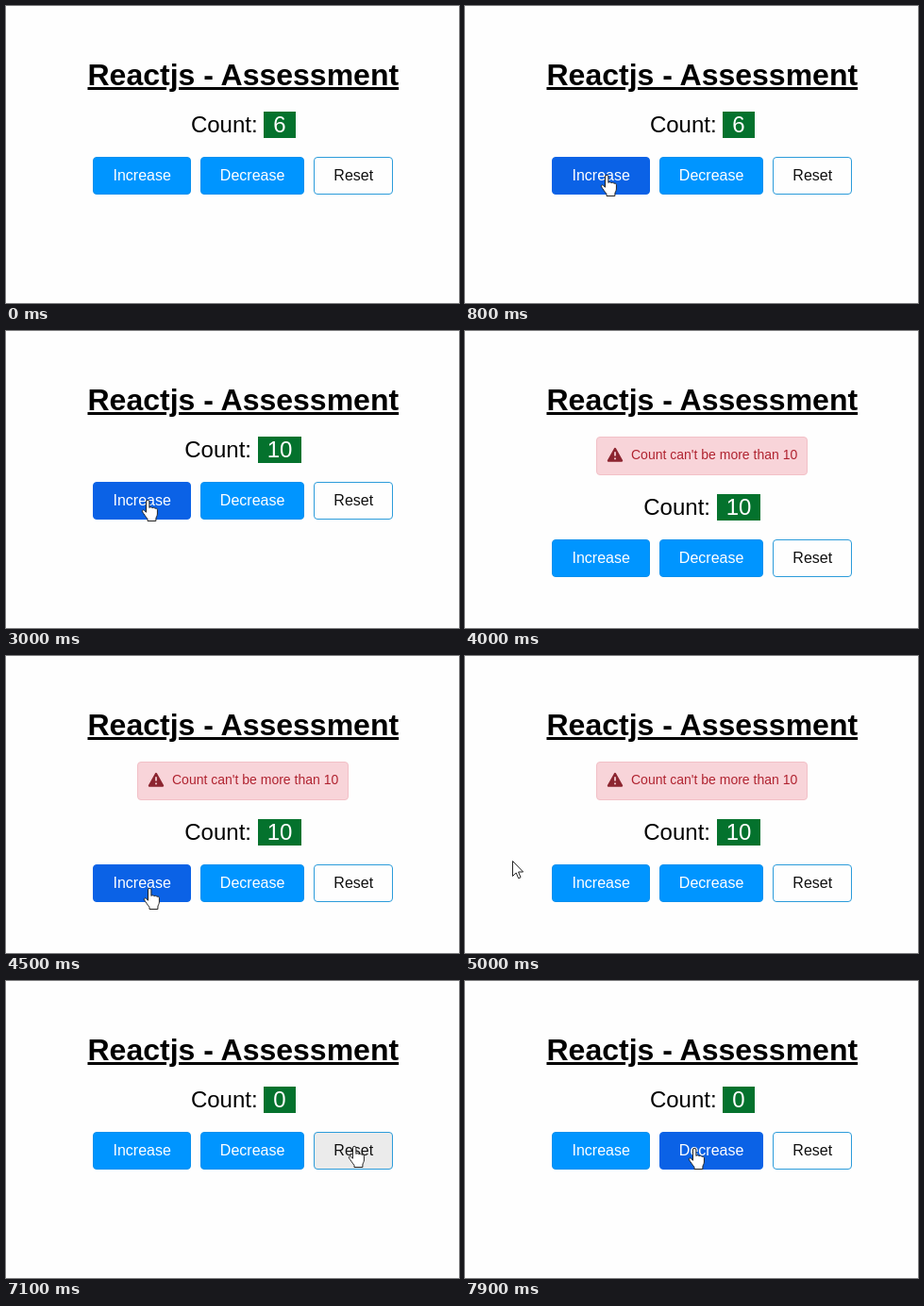
An HTML page for the animation above (8000 ms loop, 480 by 315 pixels).

```html
<!DOCTYPE html>
<html lang="en">
<head>
<meta charset="utf-8">
<title>Counter</title>
<style>
  html, body { margin: 0; width: 100%; height: 100%; overflow: hidden; background: #fefefe; }
  body { position: relative; font-family: "Liberation Sans", Arial, sans-serif; color: #000; }
  h1, #alert, #count, #buttons, #cursor { position: absolute; margin: 0; }
  h1, #count, #buttons { left: 11.3px; width: 480px; }
  h1 { top: 55px; font: bold 32px/36px "Liberation Sans", Arial, sans-serif; text-align: center; text-decoration: underline; white-space: nowrap; }
  #panel { position: absolute; left: 0; top: 0; }
  #count { top: 112px; display: flex; justify-content: center; font-size: 24px; line-height: 28px; white-space: pre; }
  #value { padding: 0 10px; background: #04722d; color: #fff; }
  #buttons { top: 160px; display: flex; justify-content: center; gap: 10px; }
  .button { box-sizing: border-box; height: 40px; padding: 10px 20px; border: 1px solid #0a90ee; border-radius: 4px; font-size: 16px; line-height: 18px; background: #0095ff; color: #fff; }
  .button.hover { background: #0b62e6; border-color: #0b62e6; }
  .button.plain { background: #fefefe; color: #111; border-color: #2c9cda; }
  .button.plain.hover { background: #ebebeb; }
  #alert { left: 139px; top: 112px; width: 224px; height: 41px; box-sizing: border-box; border: 1px solid #f2c0c7; border-radius: 4px; background: #f8d4d9; color: #b02330; font-size: 14px; line-height: 16px; white-space: nowrap; }
  #alert span { position: absolute; left: 36px; top: 10px; }
  #alert svg { position: absolute; left: 10px; top: 10px; }
  #cursor { left: 0; top: 0; overflow: visible; }
  #cursor path { fill: #fff; stroke: #222; stroke-width: 1; stroke-linejoin: round; }
</style>
</head>
<body>
<h1>Reactjs - Assessment</h1>
<div id="alert">
  <svg width="18" height="17" viewBox="0 0 18 17">
    <path d="M9 2L16 14.5H2Z" fill="#8c2530" stroke="#8c2530" stroke-width="2.4" stroke-linejoin="round"/>
    <path d="M9 5.2V9.4M9 11.6V13.2" stroke="#f8d4d9" stroke-width="1.7"/>
  </svg>
  <span>Count can't be more than 10</span>
</div>
<div id="panel">
  <div id="count">Count: <span id="value">6</span></div>
  <div id="buttons">
    <div class="button">Increase</div>
    <div class="button">Decrease</div>
    <div class="button plain">Reset</div>
  </div>
</div>
<svg id="cursor" width="24" height="26">
  <path id="arrow" d="M.5 .5V16.5L4.2 13 6.7 18.8 9 17.8 6.6 12H11.6Z"/>
  <path id="hand" transform="translate(-6.5 0)" d="M5 2a1.7 1.7 0 0 1 3.4 0V8.5c.3-1 3-1 3.2 .4 .4-1 2.8-.8 2.9 .6 .5-.8 2.4-.4 2.4 1.2V15c0 2-1.5 3.5-1.5 5V22.5H6.5V20.5C5 18.5 2.5 15 1 12.8c-.9-1.6 1-2.6 2.2-1.4L5 13.2Z"/>
</svg>
<script>
const LOOP = 8000, STEP = 100, SHIFT = 61;
const $ = id => document.getElementById(id);
const buttons = [...document.querySelectorAll(".button")];
const spans = [[92, 196], [206, 316], [326, 410]];

// [time, count, alert shown]
const states = [
  [0, 6, false], [1400, 7, false], [1800, 8, false], [2400, 9, false],
  [2900, 10, false], [3600, 10, true], [6000, 9, false], [7100, 0, false]
];

// [time, x, y] of the pointer tip
const path = [
  [400, 172, 197], [800, 150, 179], [3700, 150, 179], [4100, 150, 240],
  [4600, 152, 247], [5000, 50, 217], [5200, 140, 246], [5300, 140, 246],
  [5800, 257, 236], [6200, 257, 236], [6700, 369, 175], [7200, 369, 175],
  [7900, 243, 177]
];

const isHidden = t => t < 400 || (t >= 3900 && t < 4100);

function pointAt(t) {
  const next = path.findIndex(p => p[0] > t);
  if (next < 0) return path[path.length - 1].slice(1);
  if (next === 0) return path[0].slice(1);
  const a = path[next - 1], b = path[next];
  const k = (t - a[0]) / (b[0] - a[0]);
  return [a[1] + (b[1] - a[1]) * k, a[2] + (b[2] - a[2]) * k];
}

function render(t) {
  const [, count, alert] = states.filter(s => s[0] <= t).pop();
  const shift = alert ? SHIFT : 0;
  const hidden = isHidden(t);
  const [x, y] = pointAt(t);
  const inRow = !hidden && y >= 160 + shift && y < 200 + shift;
  const over = inRow ? spans.findIndex(([l, r]) => x >= l && x < r) : -1;

  $("value").textContent = count;
  $("alert").style.display = alert ? "block" : "none";
  $("panel").style.top = shift + "px";
  buttons.forEach((b, i) => b.classList.toggle("hover", i === over));

  $("cursor").style.display = hidden ? "none" : "block";
  $("cursor").style.transform = `translate(${Math.round(x)}px, ${Math.round(y)}px)`;
  $("arrow").style.display = over < 0 ? "inline" : "none";
  $("hand").style.display = over < 0 ? "none" : "inline";
}

const start = performance.now();
function tick() {
  const t = (performance.now() - start) % LOOP;
  render(Math.floor(t / STEP) * STEP);
  requestAnimationFrame(tick);
}
render(0);
requestAnimationFrame(tick);
</script>
</body>
</html>
```
